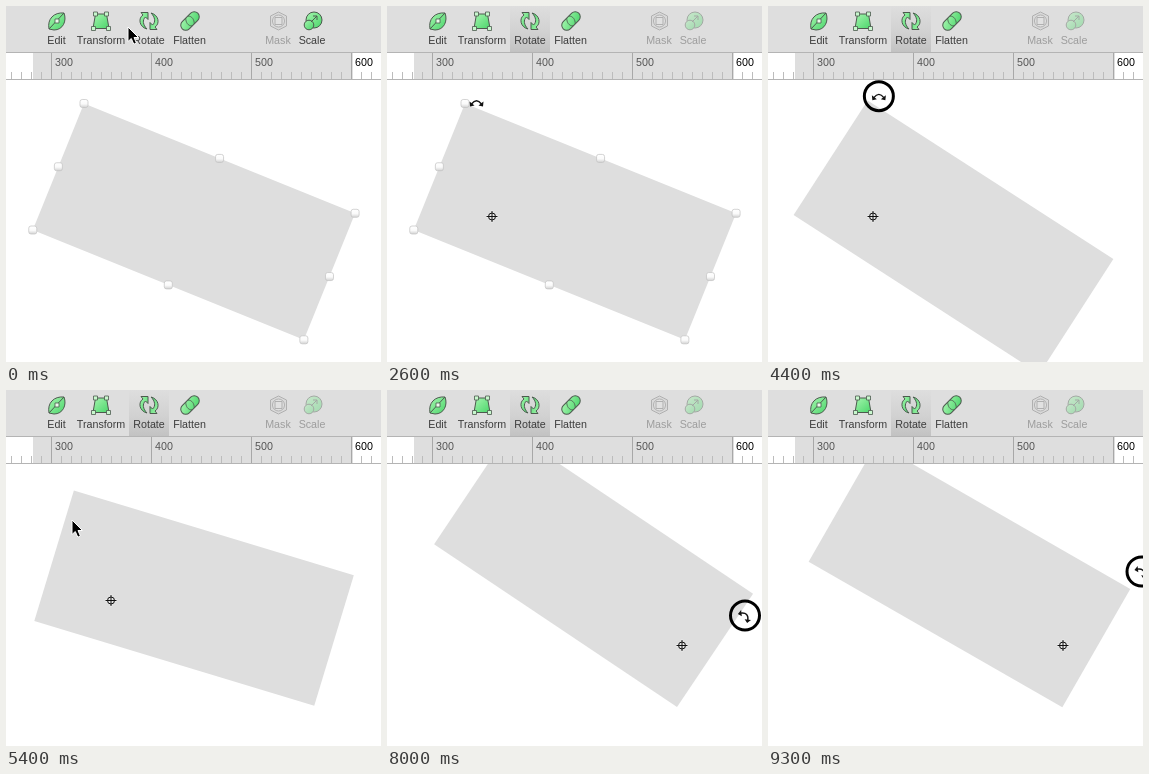
Animation of 375x356 px, one loop 9.4 s. Source, as an HTML page:

```html
<!DOCTYPE html>
<html>
<head>
<meta charset="utf-8">
<style>
html, body { margin: 0; width: 100%; height: 100%; overflow: hidden; background: #fff; }
svg { display: block; }
text { font: 10.7px "Liberation Sans", Arial, sans-serif; }
</style>
</head>
<body>
<svg id="stage" width="375" height="356" viewBox="0 0 375 356">
  <defs>
    <linearGradient id="green" x1="0" y1="0" x2="1" y2="1">
      <stop offset="0" stop-color="#a5f5ae"/><stop offset="1" stop-color="#4bd56b"/>
    </linearGradient>
    <linearGradient id="press" x1="0" y1="0" x2="0" y2="1">
      <stop offset="0" stop-color="#c4c4c4" stop-opacity="0"/>
      <stop offset=".58" stop-color="#c4c4c4" stop-opacity=".5"/>
      <stop offset="1" stop-color="#c2c2c2"/>
    </linearGradient>
    <linearGradient id="knob" x1="0" y1="0" x2="0" y2="1">
      <stop offset="0" stop-color="#fff"/><stop offset=".55" stop-color="#fafafa"/><stop offset="1" stop-color="#d2d2d2"/>
    </linearGradient>
    <clipPath id="canvas"><rect y="74" width="375" height="282"/></clipPath>
  </defs>
  <rect width="375" height="356" fill="#fff"/>
  <g clip-path="url(#canvas)">
    <g id="shape">
      <g transform="translate(78 97.5) rotate(22.05)">
        <rect width="292.5" height="136.5" fill="#dedede"/>
        <g id="handles"></g>
      </g>
    </g>
  </g>
  <rect width="375" height="46" fill="#dedede"/>
  <rect id="pressed" x="123" width="40" height="46" fill="url(#press)"/>
  <rect x="27" y="47" width="320" height="26" fill="#dedede"/>
  <g id="ruler"></g>
  <path d="M0 46.5H375M0 73.5H375" stroke="#b4b4b4"/>
  <g id="icons" fill="url(#green)" stroke="#4c5a4e" stroke-width="1" stroke-linejoin="round">
    <g transform="translate(51 15)">
      <path d="M-8 8C-10 -2 -3 -9 7 -8C10 0 6 9 -3 9Z"/>
      <path d="M-8 8L7 -8" fill="none"/>
      <path d="M-2 -2h4v4h-4Z" fill="#eafbea" stroke-width=".8"/>
    </g>
    <g transform="translate(95 15)">
      <path d="M-5.5 -7H5.5L8 7.5H-8Z"/>
      <path d="M-7.5 -9h4v4h-4ZM3.500 -9h4v4h-4ZM-9.500 5.500h4v4h-4ZM5.500 5.500h4v4h-4Z" fill="#c8f7cd" stroke-width=".8"/>
    </g>
    <g transform="translate(143 15)">
      <path id="turn" d="M-2 8C-10 6 -11 -3 -6 -6L-8 -8.500H-1V-1.500L-3.500 -4C-7 -1 -6 4 -2 8Z"/>
      <use href="#turn" transform="rotate(180)"/>
    </g>
    <g transform="translate(184 15) rotate(-45)">
      <rect x="-11" y="-5" width="22" height="10" rx="5"/>
      <path d="M-2 5C-5 2 -4 -2 -1 -5M2 -5C5 -2 4 2 1 5" fill="none" stroke-width=".8"/>
    </g>
    <g transform="translate(272.500 15)" opacity=".38" stroke="#666" fill="#d2d2d2">
      <path d="M0 -9L8 -5V5L0 9L-8 5V-5Z"/>
      <circle r="6" fill="#e8e8e8"/>
      <path d="M-3.500 -3.500h7v7h-7Z" fill="none"/>
    </g>
    <g id="scale" transform="translate(307 15)">
      <circle cx="1" cy="-1" r="8"/>
      <circle cx="-4" cy="4" r="4.800"/>
      <path d="M-2 1L4 -5M0 -5H4V-1" fill="none"/>
    </g>
  </g>
  <g id="labels" text-anchor="middle" fill="#3c3c3c"></g>
  <g id="pivot" fill="none">
    <path d="M-6 0H6M0 -6V6" stroke="#fff" stroke-width="2.500" opacity=".5"/>
    <circle r="3.500" stroke="#111"/>
    <path d="M-5.500 0H5.500M0 -5.500V5.500" stroke="#111"/>
  </g>
  <circle id="ring" fill="none" stroke="#000" stroke-width="3"/>
  <path id="arrow" d="M0 0V14.500L3.300 11.500L5.800 17.200L8.400 16L6 10.500H10.500Z" fill="#000" stroke="#fff" stroke-width="1" stroke-linejoin="round"/>
  <g id="spin">
    <path d="M-5 1Q0 -5.500 5 1" fill="none" stroke="#fff" stroke-width="3.200"/>
    <path d="M-5 1Q0 -5.500 5 1" fill="none" stroke="#111" stroke-width="1.400"/>
    <path d="M-7 -1.500L-6.500 3.500L-2 2.500ZM7 -1.500L6.500 3.500L2 2.500Z" fill="#111"/>
  </g>
</svg>
<script>
const $ = id => document.getElementById(id);
const LOOP = 9400, STEP = 100;
const PIVOT_A = [105, 210.5], PIVOT_B = [295, 255.5];

function add(parent, tag, attrs, text) {
  const el = document.createElementNS("http://www.w3.org/2000/svg", tag);
  for (const k in attrs) el.setAttribute(k, attrs[k]);
  if (text) el.textContent = text;
  return $(parent).appendChild(el);
}

for (let i = 0; i < 37; i++) {
  const x = 5.5 + i * 10, major = i % 10 === 4;
  add("ruler", "path", { d: `M${x} ${major ? 47 : 66}V73`, stroke: major ? "#a8a8a8" : "#bcbcbc" });
  if (major) {
    const n = 300 + (i - 4) * 10;
    add("ruler", "text", { x: x + 3.5, y: 60, fill: n === 600 ? "#000" : "#555" }, String(n));
  }
}

const names = [["Edit", 50.5], ["Transform", 95], ["Rotate", 143], ["Flatten", 183.5], ["Mask", 272], ["Scale", 306]];
const labels = names.map(([s, x]) => add("labels", "text", { x, y: 38 }, s));
labels[4].setAttribute("opacity", 0.4);

for (const u of [0, 0.5, 1]) for (const v of [0, 0.5, 1]) {
  if (u === 0.5 && v === 0.5) continue;
  add("handles", "rect", {
    x: -4, y: -4, width: 8, height: 8, rx: 2.2, fill: "url(#knob)", stroke: "#c2c2c2", "stroke-width": 0.7,
    transform: `translate(${u * 292.5} ${v * 136.5}) rotate(-22)`
  });
}

// Smooth curve through [time, value] keys that never overshoots
function curve(keys, t) {
  const n = keys.length;
  if (t <= keys[0][0]) return keys[0][1];
  if (t >= keys[n - 1][0]) return keys[n - 1][1];
  const slope = i => (keys[i + 1][1] - keys[i][1]) / (keys[i + 1][0] - keys[i][0]);
  const tangent = i => {
    if (i === 0 || i === n - 1) return 0;
    const a = slope(i - 1), b = slope(i);
    return a * b <= 0 ? 0 : 2 * a * b / (a + b);
  };
  let i = 0;
  while (keys[i + 1][0] < t) i++;
  const h = keys[i + 1][0] - keys[i][0], s = (t - keys[i][0]) / h, r = 1 - s;
  return keys[i][1] * (1 + 2 * s) * r * r + tangent(i) * h * s * r * r
    + keys[i + 1][1] * s * s * (3 - 2 * s) - tangent(i + 1) * h * s * s * r;
}

const track = (keys, t) => [1, 2].map(c => curve(keys.map(k => [k[0], k[c]]), t));
const within = (t, a, b) => t >= a && t < b;

const turnA = [[2700, 0], [3400, -35], [3600, -37], [3750, -37], [4400, 10.8], [4700, 4], [5100, -5.2]];
const turnB = [[7500, 0], [8000, 17], [8200, 25], [8500, 10], [8800, -4], [9300, 13]];
const reach = [[2700, 114], [3400, 133], [3700, 133], [4400, 120], [4700, 133]];
const toCorner = [
  [0, 122, 21], [200, 133, 18], [500, 134, 18], [800, 172, 140], [1000, 186, 225], [1300, 186, 216],
  [1500, 186, 216], [2000, 105, 211], [2100, 105, 211], [2500, 89.5, 97]
];
const toSecond = [
  [5200, 75, 81], [5400, 66, 130], [5700, 105, 211], [5800, 105, 211], [6150, 336, 288], [6600, 295, 252],
  [6700, 295, 256], [6900, 295, 256], [7300, 345, 184], [7500, 351, 175], [7700, 362, 190], [8000, 358, 226],
  [8200, 361, 238], [8500, 371, 190], [8800, 347, 168], [9300, 373.5, 182]
];

function cursorAt(t) {
  if (t < 2700) return track(toCorner, t);
  if (t >= 5200) return track(toSecond, t);
  const a = (curve(turnA, t) - 98) * Math.PI / 180, r = curve(reach, t);
  return [PIVOT_A[0] + r * Math.cos(a), PIVOT_A[1] + r * Math.sin(a)];
}

function pivotAt(t, [x, y]) {
  if (t < 1500) return [187.5, 215.5];
  if (within(t, 1500, 2100) || within(t, 5800, 6800)) return [x, y - 0.5];
  return t < 5800 ? PIVOT_A : PIVOT_B;
}

const show = (id, on) => $(id).setAttribute("display", on ? "inline" : "none");
const place = (id, [x, y], extra = "") => $(id).setAttribute("transform", `translate(${x} ${y}) ${extra}`);

function draw(t) {
  const pos = cursorAt(t), rotating = t >= 400;
  const turning = within(t, 2700, 5300) || t >= 7600;
  const moving = within(t, 1500, 2100) || within(t, 5800, 6800);
  const spin = within(t, 2400, 5300) || t >= 7300;

  $("shape").setAttribute("transform",
    `rotate(${curve(turnB, t)} ${PIVOT_B}) rotate(${curve(turnA, t)} ${PIVOT_A})`);
  show("handles", !(within(t, 1600, 2100) || within(t, 2700, 6800) || t >= 7600));
  show("pressed", rotating);
  $("scale").setAttribute("opacity", rotating ? 0.4 : 1);
  labels[5].setAttribute("opacity", rotating ? 0.4 : 1);

  show("pivot", rotating);
  place("pivot", pivotAt(t, pos));
  show("arrow", !spin);
  place("arrow", pos);
  show("spin", spin);
  place("spin", pos, t >= 7300 ? "rotate(45)" : "");

  show("ring", turning || moving || within(t, 300, 500));
  $("ring").setAttribute("r", turning ? 14.5 : 20.5);
  place("ring", turning ? [pos[0], pos[1] - 0.5] : [pos[0] + 1, pos[1] + 3]);
}

const start = performance.now();
function tick() {
  const t = (performance.now() - start) % LOOP;
  draw(Math.floor(t / STEP) * STEP);
  requestAnimationFrame(tick);
}
draw(0);
requestAnimationFrame(tick);
</script>
</body>
</html>
```
